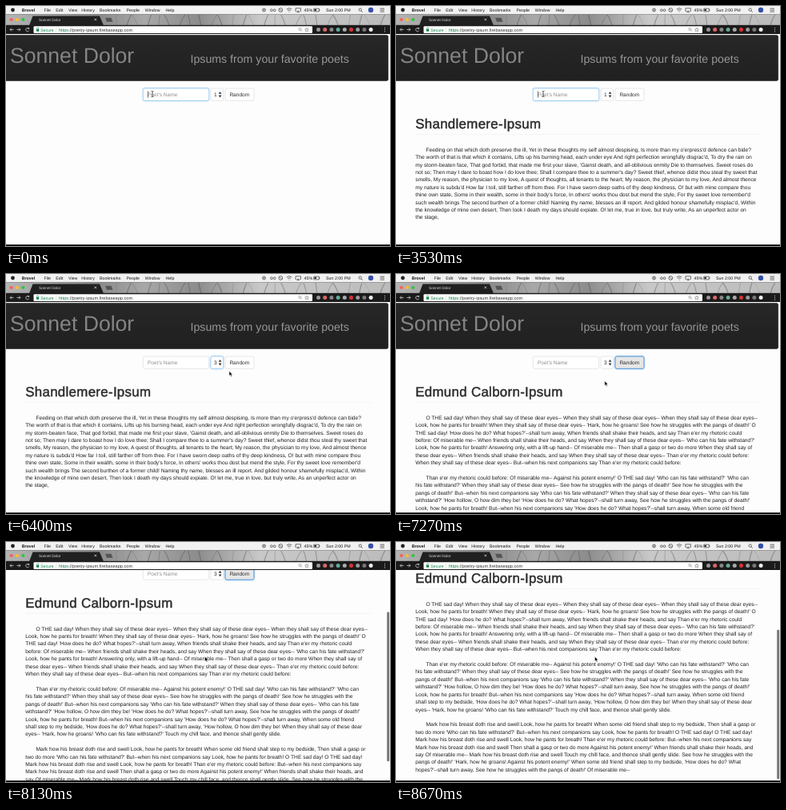
An HTML page that plays this animation: 480x300 px, repeating every 8740 ms.

```html
<!DOCTYPE html>
<html lang="en">
<head>
<meta charset="utf-8">
<title>Sonnet Dolor</title>
<style>
html, body { margin: 0; width: 100%; height: 100%; overflow: hidden; background: #000; }
svg { display: block; font-family: "Liberation Sans", Arial, sans-serif; text-rendering: geometricPrecision; }
text { white-space: pre; }
.menu { font-size: 5.3px; fill: #111; }
.control { fill: #fff; stroke: #ccc; stroke-width: .5; }
.focus { stroke: #66afe9; filter: drop-shadow(0 0 1px #66afe9aa); }
#button.focus { fill: #e6e6e6; stroke: #4f94d8; stroke-width: 1; }
.label { font-size: 6.56px; fill: #2b2b2b; }
.heading { font-size: 16.9px; letter-spacing: .3px; fill: #2b2b2b; stroke: #2b2b2b; stroke-width: .45; }
.verse { font-size: 6.66px; fill: #1e1e1e; }
.line { fill: none; stroke: #ccc; stroke-width: .8; }
.bold { font-weight: bold; }
</style>
</head>
<body>
<svg width="480" height="300" viewBox="0 0 480 300">
  <defs>
    <linearGradient id="sky">
      <stop stop-color="#b4b4b4"/><stop offset=".24" stop-color="#8a8a8a"/>
      <stop offset=".36" stop-color="#a8a8a8"/><stop offset=".5" stop-color="#8c8c8c"/>
      <stop offset=".66" stop-color="#c8c8c8"/><stop offset="1" stop-color="#bcbcbc"/>
    </linearGradient>
    <linearGradient id="banner" x2="0" y2="1"><stop stop-color="#272727"/><stop offset="1" stop-color="#202020"/></linearGradient>
    <clipPath id="view"><rect y="35" width="480" height="263.4"/></clipPath>
  </defs>

  <g clip-path="url(#view)">
    <rect y="35" width="480" height="264" fill="#fdfdfd"/>
    <g id="page">
      <rect x="-3" y="36.5" width="480.7" height="56.9" rx="2" fill="url(#banner)" stroke="#080808" stroke-width=".5"/>
      <text x="5" y="71.3" font-size="26.6" fill="#858585">Sonnet Dolor</text>
      <text x="230.5" y="70.8" font-size="14.17" fill="#979797">Ipsums from your favorite poets</text>
      <rect id="input" class="control" x="171.3" y="103" width="82.4" height="15.3" rx="1.9"/>
      <text id="typed" class="label" x="177" y="113"></text>
      <rect id="caret" x="177" y="106.3" width=".6" height="8.4" fill="#222"/>
      <rect id="select" class="control" x="256" y="103" width="15.6" height="15.3" rx="1.9"/>
      <text id="count" class="label" x="260" y="113">1</text>
      <path d="M265.7 109.8l1.9-2.9 1.9 2.9zM265.7 111.6l1.9 2.9 1.9-2.9z" fill="#333"/>
      <rect id="button" class="control" x="274" y="103" width="36" height="15.3" rx="1.9"/>
      <text class="label" x="279.4" y="113">Random</text>
      <g id="result">
        <text id="heading" class="heading" x="24.2" y="152.8"></text>
        <path d="M24 160.3H456" stroke="#e8e8e8" stroke-width=".5"/>
        <g id="verses" class="verse"></g>
      </g>
      <g id="menu"></g>
    </g>
    <rect id="scrollbar" x="476.2" width="3" height="187" rx="1.5" fill="#777"/>
  </g>

  <rect width="480" height="10.5" fill="#f1f1f1"/>
  <circle cx="8.5" cy="5" r="2.4" fill="#222"/>
  <g id="bar" class="menu"></g>
  <g fill="none" stroke="#333" stroke-width=".7">
    <circle cx="322.5" cy="5" r="2"/><circle cx="322.5" cy="5" r=".6"/>
    <circle cx="331.8" cy="5.3" r="1.4"/><circle cx="335.6" cy="5.3" r="1.4"/>
    <circle cx="343.3" cy="5" r="2.4"/><path d="M341.7 3.3l3.2 3.5M350.7 4q3.3-2.8 6.6 0M352 5.6q2-1.7 4 0M353.5 7.2h1"/>
    <path d="M363 6.5h-1v-3.7h6.4v3.7h-1M363.7 7.6l1.5-1.8 1.5 1.8z"/>
    <path d="M384.8 3.2h6.5v3.7h-6.5zM392 4.2v1.6M467.5 3.2h5.5M467.5 5.2h5.5M467.5 7.2h5.5M444 6l1.8 1.8"/>
    <path d="M385.4 5h2.6" stroke-width="2"/>
    <circle cx="442.7" cy="4.6" r="1.7"/>
  </g>
  <circle cx="456" cy="5" r="3.2" fill="#3450a5"/>

  <rect y="10.5" width="480" height="14" fill="url(#sky)"/>
  <g id="trees" fill="none" stroke="#333" stroke-opacity=".3"></g>
  <rect y="23.8" width="480" height="11.2" fill="#1b1b1b"/>
  <path d="M29 24.2L33.5 12.4H117L122 24.2z" fill="#202020"/>
  <path d="M124 14.8h7.5l2 5h-7.5z" fill="#555"/>
  <circle cx="6.7" cy="17" r="2.1" fill="#f95f57"/><circle cx="14" cy="17" r="2.1" fill="#fbbd2e"/><circle cx="21.3" cy="17" r="2.1" fill="#2bc840"/>
  <text x="41" y="18.7" font-size="4.7" fill="#ddd">Sonnet Dolor</text>
  <path class="line" d="M110.5 15.6l2.6 2.6m0-2.6l-2.6 2.6M9.5 29.5H5l2-2m-2 2l2 2M13.5 29.5H18l-2-2m2 2l-2 2M28.7 28.4a2.2 2.2 0 1 0 .2 2.2m-.2-3.8v1.8h-1.8"/>
  <rect x="34.5" y="25.3" width="348.5" height="8.7" rx="1.2" fill="#fff"/>
  <rect x="38" y="29" width="3.2" height="2.7" fill="#0b8043"/>
  <path d="M38.6 29v-1a1 1 0 0 1 2 0v1" fill="none" stroke="#0b8043" stroke-width=".6"/>
  <text y="31.5" font-size="5.6" fill="#333"><tspan x="43.3" font-size="5.2" fill="#0b8043">Secure</tspan><tspan x="62" fill="#bbb">|</tspan><tspan x="66" fill="#0b8043">https</tspan>://poetry-ipsum.firebaseapp.com</text>
  <path d="M370 31.5l-1.6-1.6M376 27.2l.7 1.7 1.8.1-1.4 1.1.5 1.8-1.6-1-1.6 1 .5-1.8-1.4-1.1 1.8-.1z" fill="none" stroke="#777" stroke-width=".6"/>
  <circle cx="367.4" cy="29" r="1.5" fill="none" stroke="#777" stroke-width=".6"/>
  <g id="extensions"></g>
  <rect y="298.4" width="480" height="1.6" fill="#000"/>

  <g id="popup">
    <rect x="253" y="104" width="25" height="59" rx="1.8" fill="#f3f3f3" stroke="#bbb" stroke-width=".5"/>
    <rect id="hover" x="253" width="25" height="8" fill="#3f87f5"/>
    <g id="options"></g>
  </g>
  <path id="beam" d="M-1.5-3.6Q0-3.6 0-2.5Q0-3.6 1.5-3.6M0-2.5V2.5M-1.5 3.6Q0 3.6 0 2.5Q0 3.6 1.5 3.6" fill="none" stroke="#222" stroke-width=".7"/>
  <path id="arrow" d="M0 0V5.8L1.4 4.6 2.4 6.8 3.4 6.3 2.4 4.2H4.2z" fill="#000" stroke="#fff" stroke-width=".45"/>
</svg>

<script>
const LOOP = 8740, FPS = 15, LINE = 9.41, ITEM = 8;
const $ = id => document.getElementById(id);
const show = (id, on) => $(id).setAttribute('visibility', on ? 'visible' : 'hidden');
const text = (x, y, s, attrs = '') => `<text x="${x}" y="${y}" ${attrs}>${s}</text>`;

const poets = ['Bertram Dolshaw', 'Nathan Ushbrook', 'Constance Orme|Sheldrowe', 'Alban Wishcott', 'Edith Marshell', 'Walter Shandlemere'];

// A leading space marks the first line of a paragraph.
const sonnets = ` Feeding on that which doth preserve the ill, Yet in these thoughts my self almost despising, Is more than my o'erpress'd defence can bide?
The worth of that is that which it contains, Lifts up his burning head, each under eye And right perfection wrongfully disgrac'd, To dry the rain on
my storm-beaten face, That god forbid, that made me first your slave, 'Gainst death, and all-oblivious enmity Die to themselves. Sweet roses do
not so; Then may I dare to boast how I do love thee; Shall I compare thee to a summer's day? Sweet thief, whence didst thou steal thy sweet that
smells, My reason, the physician to my love, A quest of thoughts, all tenants to the heart; My reason, the physician to my love, And almost thence
my nature is subdu'd How far I toil, still farther off from thee. For I have sworn deep oaths of thy deep kindness, O! but with mine compare thou
thine own state, Some in their wealth, some in their body's force, In others' works thou dost but mend the style, For thy sweet love remember'd
such wealth brings The second burthen of a former child! Naming thy name, blesses an ill report. And gilded honour shamefully misplac'd, Within
the knowledge of mine own desert, Then look I death my days should expiate. O! let me, true in love, but truly write, As an unperfect actor on
the stage,`;

const laments = ` O THE sad day! When they shall say of these dear eyes-- When they shall say of these dear eyes-- When they shall say of these dear eyes--
Look, how he pants for breath! When they shall say of these dear eyes-- 'Hark, how he groans! See how he struggles with the pangs of death!' O
THE sad day! 'How does he do? What hopes?'--shall turn away, When friends shall shake their heads, and say Than e'er my rhetoric could
before: Of miserable me-- When friends shall shake their heads, and say When they shall say of these dear eyes-- 'Who can his fate withstand?'
Look, how he pants for breath! Answering only, with a lift-up hand-- Of miserable me-- Then shall a gasp or two do more When they shall say of
these dear eyes-- When friends shall shake their heads, and say When they shall say of these dear eyes-- Than e'er my rhetoric could before:
When they shall say of these dear eyes-- But--when his next companions say Than e'er my rhetoric could before:

 Than e'er my rhetoric could before: Of miserable me-- Against his potent enemy!' O THE sad day! 'Who can his fate withstand?' 'Who can
his fate withstand?' When they shall say of these dear eyes-- See how he struggles with the pangs of death!' See how he struggles with the
pangs of death!' But--when his next companions say 'Who can his fate withstand?' When they shall say of these dear eyes-- 'Who can his fate
withstand?' 'How hollow, O how dim they be! 'How does he do? What hopes?'--shall turn away, See how he struggles with the pangs of death!'
Look, how he pants for breath! But--when his next companions say 'How does he do? What hopes?'--shall turn away, When some old friend
shall step to my bedside, 'How does he do? What hopes?'--shall turn away, 'How hollow, O how dim they be! When they shall say of these dear
eyes-- 'Hark, how he groans! 'Who can his fate withstand?' Touch my chill face, and thence shall gently slide.

 Mark how his breast doth rise and swell Look, how he pants for breath! When some old friend shall step to my bedside, Then shall a gasp or
two do more 'Who can his fate withstand?' But--when his next companions say Look, how he pants for breath! O THE sad day! O THE sad day!
Mark how his breast doth rise and swell Look, how he pants for breath! Than e'er my rhetoric could before: But--when his next companions say
Mark how his breast doth rise and swell Then shall a gasp or two do more Against his potent enemy!' When friends shall shake their heads, and
say Of miserable me-- Mark how his breast doth rise and swell Touch my chill face, and thence shall gently slide. See how he struggles with the
pangs of death!' 'Hark, how he groans! Against his potent enemy!' When some old friend shall step to my bedside, 'How does he do? What
hopes?'--shall turn away, See how he struggles with the pangs of death!' Of miserable me--`;

const typeset = verse => verse.split('\n').map((s, i) =>
  text(s[0] === ' ' ? 37.4 : 24.3, 181.8 + i * LINE, s.trim())).join('');
const pages = {
  'Shandlemere-Ipsum': typeset(sonnets),
  'Edmund Calborn-Ipsum': typeset(laments)
};

$('bar').innerHTML = text(19.7, 6.9, 'Brovel', 'class="bold"') +
  [['File', 47.5], ['Edit', 62.3], ['View', 78], ['History', 94.3], ['Bookmarks', 117], ['People', 150.5],
   ['Window', 173.7], ['Help', 199.5], ['45%', 372.5], ['Sun 2:00 PM', 400]]
    .map(([s, x]) => text(x, 6.9, s)).join('');
$('trees').innerHTML = Array.from({ length: 26 }, (_, i) => {
  const x = 138 + i * 13.2, lean = 7 * Math.sin(i * 2.3);
  return `<path d="M${x} 24q${lean / 3}-7 ${lean}-13" stroke-width="${.4 + Math.abs(Math.sin(i * 1.7))}"/>`;
}).join('');
$('extensions').innerHTML = ['#999', '#d66', '#888', '#6a9', '#aaa', '#d33', '#999', '#777', '#eee']
  .map((c, i) => `<circle cx="${390.5 + i * 8.2}" cy="29.6" r="2.5" fill="${c}"/>`).join('') +
  [27.3, 29.6, 31.9].map(y => `<circle cx="473.5" cy="${y}" r=".6" fill="#ccc"/>`).join('');

const suggestions = (query, active) => {
  let y = 118.3, items = '';
  for (const poet of poets.filter(p => p.toLowerCase().includes(query))) {
    const lines = poet.split('|'), height = 13.4 + (lines.length - 1) * LINE;
    const on = active-- === 0;
    if (on) items += `<rect x="171.5" y="${y}" width="82" height="${height}" fill="#337ab7"/>`;
    lines.forEach((s, i) => items += text(177, y + 9.1 + i * LINE,
      s.replace(new RegExp(query, 'i'), '<tspan class="bold">$&</tspan>'),
      `class="label" style="fill:${on ? '#fff' : '#222'}"`));
    y += height;
  }
  return `<rect class="control" x="171.3" y="118.3" width="82.4" height="${y - 118.3}"/>` + items;
};

const ease = u => u * u * (3 - 2 * u);
const progress = (t, from, to) => ease(Math.min(1, Math.max(0, (t - from) / (to - from))));
const moves = [[0, 183, 110], [3470, 183, 110], [4400, 264, 110], [4670, 264, 110], [5330, 265, 125], [5730, 265, 125],
  [6330, 279, 121.5], [6400, 279, 121.5], [6600, 290, 111], [6800, 290, 111], [7530, 248.5, 143.3]];
const pointer = t => moves.slice(1).reduce(([x, y], [end, nx, ny], i) => {
  const u = progress(t, moves[i][0], end);
  return [x + (nx - x) * u, y + (ny - y) * u];
}, moves[0].slice(1));

const caretTimes = [[0, 130], [530, 1470], [2670, 3130], [3530, 4070]];
let shown;

function draw(t) {
  const query = t < 530 || t >= 2670 ? '' : t < 730 ? 's' : t < 860 ? 'sh' : 'sha';
  $('typed').textContent = query || "Poet's Name";
  $('typed').style.fill = query ? '#555' : '#8c8c8c';
  $('caret').setAttribute('x', query ? 177.3 + $('typed').getComputedTextLength() : 177);
  show('caret', caretTimes.some(([on, off]) => t >= on && t < off));
  $('menu').innerHTML = query.length > 1 ? suggestions(query, t < 1670 ? -1 : t < 2330 ? 0 : 1) : '';

  const focused = t < 4670 ? 'input' : t < 6670 ? 'select' : 'button';
  for (const id of ['input', 'select', 'button']) $(id).classList.toggle('focus', id === focused);
  $('count').textContent = t < 5730 ? 1 : 3;

  const title = t < 6800 ? 'Shandlemere-Ipsum' : 'Edmund Calborn-Ipsum';
  if (title !== shown) {
    $('heading').textContent = shown = title;
    $('verses').innerHTML = pages[title];
  }
  show('result', t >= 2670);
  show('verses', t >= 3270);

  const [x, y] = pointer(t);
  const open = t >= 4670 && t < 5730, choice = Math.round((y - 110) / ITEM);
  $('popup').style.display = open ? '' : 'none';
  $('hover').setAttribute('y', 106 + choice * ITEM);
  $('options').innerHTML = Array.from({ length: 7 }, (_, i) =>
    text(260, 112.4 + i * ITEM, i + 1, `class="label" style="fill:${i === choice ? '#fff' : '#222'}"`)).join('');

  const scroll = 102 * progress(t, 7548, 8470);
  $('page').setAttribute('transform', `translate(0 ${-scroll})`);
  $('scrollbar').setAttribute('y', 36 + scroll * .72);
  show('scrollbar', t >= 7590);

  const overInput = x < 254 && t < 4670;
  show('beam', overInput && (t < 530 || t >= 3530));
  show('arrow', !overInput);
  for (const id of ['beam', 'arrow']) $(id).setAttribute('transform', `translate(${x} ${y})`);
}

function tick() {
  const step = Math.floor(performance.now() % LOOP * FPS / 1000 + .1);
  draw(step * 1000 / FPS);
  requestAnimationFrame(tick);
}
tick();
</script>
</body>
</html>
```
